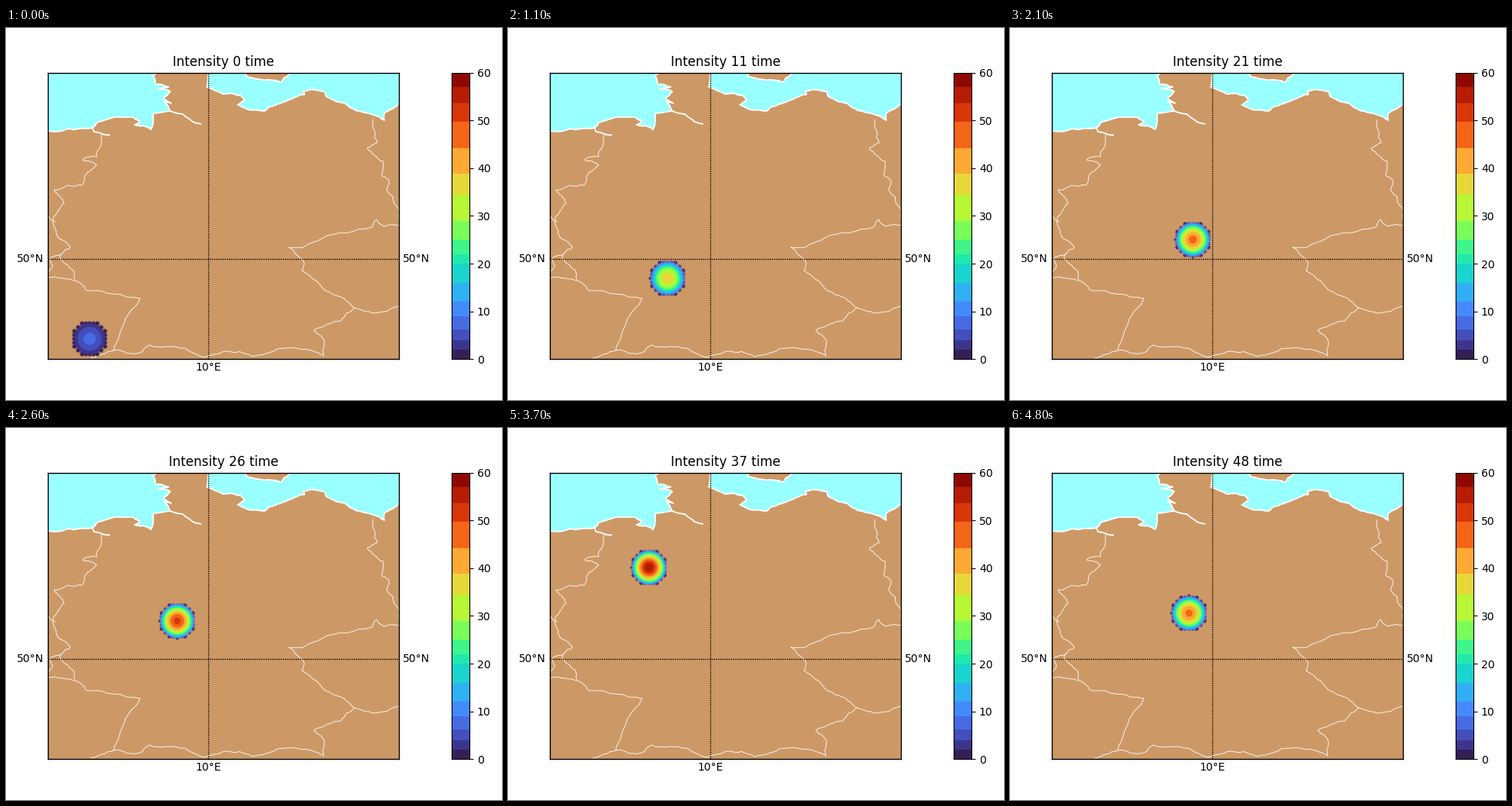
Animation, 640 px wide and 480 px high, one loop 4900 ms. Source, as a matplotlib script:

```python
import numpy as np
import matplotlib.pyplot as plt
from matplotlib.animation import FuncAnimation
from matplotlib.collections import LineCollection
from matplotlib.colors import BoundaryNorm, ListedColormap

W, H, FRAMES = 640, 480, 49
LEFT, RIGHT, TOP, BOTTOM = 54.4, 507.4, 57.6, 427.2
LAND, SEA = "#cc9966", "#99ffff"
CELL, RADIUS = 4.92, 23.6

plt.rcParams["font.family"] = "DejaVu Sans"
rng = np.random.default_rng(4)


def rough(points, amp=0.14, depth=3):
    """Roughen a polyline by repeated midpoint displacement."""
    pts = np.array(points, float)
    for _ in range(depth):
        step = np.diff(pts, axis=0)
        normal = np.column_stack([-step[:, 1], step[:, 0]])
        push = rng.uniform(-amp, amp, (len(step), 1))
        out = np.empty((2 * len(pts) - 1, 2))
        out[::2] = pts
        out[1::2] = pts[:-1] + step / 2 + normal * push
        pts = out
    return pts


# Coasts, in stage pixels
north_sea = rough([
    (54, 133), (80, 130), (112, 129), (117, 122), (164, 115), (173, 121),
    (166, 125), (177, 126), (187, 131), (190, 110), (212, 107), (204, 95),
    (213, 97), (203, 91), (212, 82), (196, 79), (210, 76), (193, 73),
    (190, 62), (195, 58)], 0.09, 2)
baltic = rough([
    (261, 58), (259, 76), (303, 87), (308, 93), (299, 99), (334, 107),
    (338, 103), (362, 94), (385, 86), (384, 81), (411, 82), (413, 88),
    (437, 97), (456, 107), (488, 119), (488, 110), (507.4, 97)], 0.09)
island = rough([(309, 58), (311, 63), (355, 70), (358, 65), (367, 58)], 0.06)
elbe = rough([(212, 107), (228, 111), (241, 121), (252, 124)], 0.06, 2)
ems = rough([(112, 129), (114, 134), (134, 138)], 0.08, 2)

# Land borders
west = rough([
    (124, 138), (117, 166), (99, 170), (117, 177), (102, 190), (98, 203),
    (62, 209), (75, 226), (62, 243), (66, 268), (83, 283), (71, 292)])
meuse = rough([(54, 241), (64, 250)])
ardennes = rough([(71, 292), (58, 296), (60, 306), (54, 316)])
moselle = rough([(71, 292), (70, 298), (88, 315), (89, 325)])
rhine = rough([
    (54, 322), (92, 327), (105, 339), (173, 349), (154, 375), (139, 416),
    (109, 426)], 0.09)
south = rough([
    (139, 416), (175, 418), (185, 409), (230, 413), (255, 425), (283, 417),
    (318, 424), (362, 413), (410, 423), (411, 405), (397, 390), (432, 378),
    (450, 361)], 0.1)
czech = rough([
    (507, 359), (475, 368), (450, 361), (418, 341), (382, 313), (385, 304),
    (365, 283), (383, 283), (407, 272), (472, 257), (478, 247), (488, 256),
    (507, 254)], 0.1)
oder = rough([
    (473, 118), (479, 148), (466, 155), (487, 172), (485, 190), (494, 197),
    (491, 208), (504, 230), (507, 246)])

# Uneven colour bands of the intensity scale
bounds = [0, 2, 4, 6.2, 9, 12, 16, 20, 22, 25, 29, 34.4, 38.8, 44.2, 49.7,
          53.6, 57, 60]
mids = (np.array(bounds[:-1]) + bounds[1:]) / 2
cmap = ListedColormap(plt.get_cmap("turbo")(mids / 60))
norm = BoundaryNorm(bounds, cmap.N)

# Storm track in grid steps, with peak intensity
key_t = np.array([0, 7, 16, 26, 33, 41, 48.0])
key_x = np.array([0, 14, 25, 23, 16, 16, 25.0])
key_y = np.array([0, 10, 22, 31, 41, 45, 33.0])
key_peak = np.array([7, 32, 41, 51.5, 56, 55.5, 46])


def hermite(t, values):
    slope = np.gradient(values, key_t)
    i = min(np.searchsorted(key_t, t, side="right") - 1, len(key_t) - 2)
    h = key_t[i + 1] - key_t[i]
    u = (t - key_t[i]) / h
    return ((1 + 2 * u) * (1 - u) ** 2 * values[i]
            + u * (1 - u) ** 2 * h * slope[i]
            + u * u * (3 - 2 * u) * values[i + 1]
            + u * u * (u - 1) * h * slope[i + 1])


HALF = 30
axis = (np.arange(HALF * 8) + 0.5) / 4 - HALF
gx, gy = np.meshgrid(axis, axis)
dist = np.hypot(gx, gy)


def disc(cx, cy, r):
    return r - np.hypot(gx - cx, gy - cy)


# Scalloped outline: small discs on every grid node near the centre
outline = 21 - dist
for i in range(-4, 5):
    for j in range(-4, 5):
        if i * i + j * j <= 20:
            outline = np.maximum(outline, disc(i * CELL, j * CELL, 3.5))


def storm(peak, nx, ny):
    edge = outline
    if nx > 13:
        edge = np.maximum(edge, disc(-22.3, 0, 2.7))
    if 20 < ny < 44:
        edge = np.maximum(edge, disc(0, 22.3 if ny < 32 else -22.3, 2.7))
    value = np.clip(peak * (1 - (dist / RADIUS) ** 2), 0, 59.9)
    rgba = cmap(norm(value))
    rgba[..., 3] = np.clip(edge / 1.5, 0, 1)
    return rgba


def add_axes(x0, x1):
    return fig.add_axes([x0 / W, 1 - BOTTOM / H, (x1 - x0) / W, (BOTTOM - TOP) / H])


def add_lines(lines, width):
    ax.add_collection(LineCollection(lines, colors="white", linewidths=width, zorder=2))


fig = plt.figure(figsize=(W / 100, H / 100), dpi=100, facecolor="white")
ax = add_axes(LEFT, RIGHT)
ax.set_facecolor(LAND)
ax.set_xticks([])
ax.set_yticks([])
for spine in ax.spines.values():
    spine.set_linewidth(1)
    spine.set_zorder(8)

ax.fill(*np.vstack([north_sea, [(54, 57)]]).T, color=SEA, lw=0)
ax.fill(*np.vstack([baltic, [(508, 57), (261, 57)]]).T, color=SEA, lw=0)
ax.fill(*island.T, color=LAND, lw=0, zorder=1.5)
add_lines([north_sea, baltic, island, elbe, ems], 1.3)
add_lines([west, meuse, ardennes, moselle, rhine, south, czech, oder], 0.6)
dots = dict(color="black", lw=1, dashes=[1, 1], zorder=3)
ax.plot([261, 261], [BOTTOM, TOP], **dots)
ax.plot([LEFT, RIGHT], [298, 298], **dots)
ax.text(49, 298, "50°N", ha="right", va="center")
ax.text(512, 298, "50°N", ha="left", va="center")
ax.text(261, 431, "10°E", ha="center", va="top")

blob = ax.imshow(storm(7, 0, 0), extent=(0, 1, 1, 0), aspect="auto", zorder=5)
ax.set_xlim(LEFT, RIGHT)
ax.set_ylim(BOTTOM, TOP)
title = ax.set_title("")

bar = add_axes(575, 598.1)
bar.pcolormesh([0, 1], bounds, mids[:, None], cmap=cmap, norm=norm)
bar.set_xticks([])
bar.set_ylim(0, 60)
bar.yaxis.tick_right()
bar.set_yticks(range(0, 61, 10))


def update(n):
    nx, ny = round(hermite(n, key_x)), round(hermite(n, key_y))
    x, y = 108 + CELL * nx, 401.3 - CELL * ny
    blob.set_data(storm(hermite(n, key_peak), nx, ny))
    blob.set_extent((x - HALF, x + HALF, y + HALF, y - HALF))
    ax.set_xlim(LEFT, RIGHT)
    ax.set_ylim(BOTTOM, TOP)
    title.set_text(f"Intensity {n} time")
    return blob, title


anim = FuncAnimation(fig, update, frames=FRAMES, interval=100, repeat=True,
                     repeat_delay=0, blit=False)
plt.show()
```
